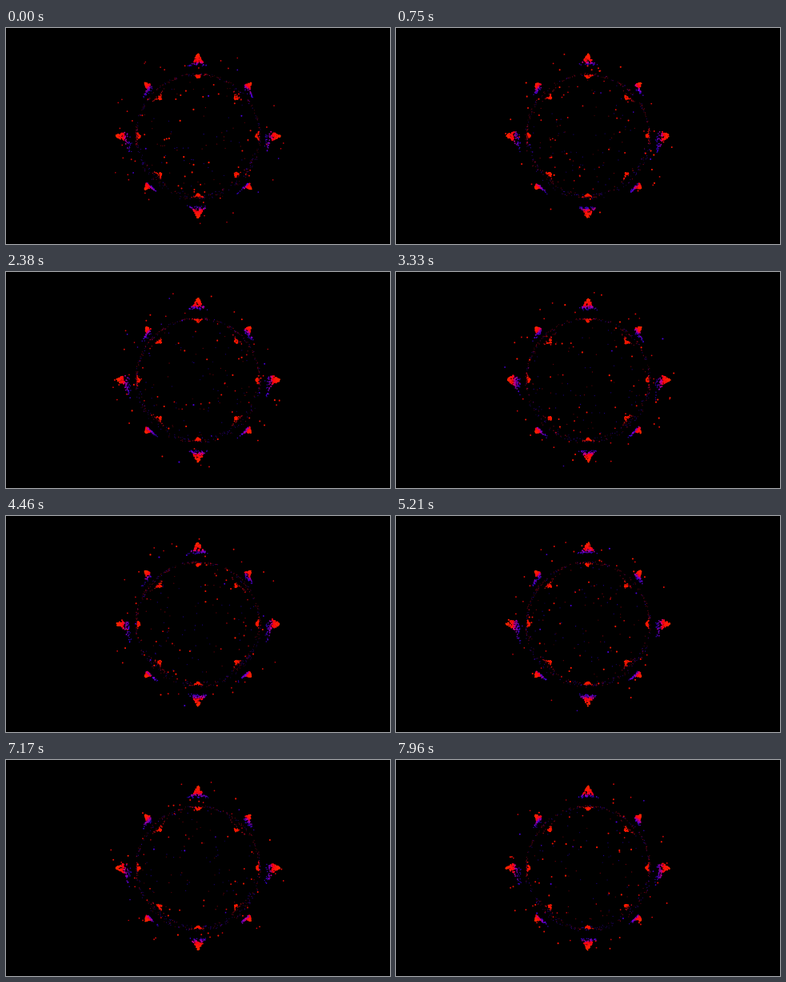
These frames come from a looping animation (480 px wide and 270 px high, 8000 ms). An HTML page with a canvas:

```html
<!DOCTYPE html>
<html lang="en">
<head>
<meta charset="utf-8">
<title>Particle ring</title>
<style>
  html, body { margin: 0; width: 100%; height: 100%; overflow: hidden; background: #000; }
  canvas { display: block; width: 480px; height: 270px; }
</style>
</head>
<body>
<canvas id="stage" width="480" height="270"></canvas>
<script>
const ctx = document.getElementById('stage').getContext('2d');
const LOOP = 8000, FPS = 24, CX = 240, CY = 135, TAU = Math.PI * 2;

function random(seed) {
  let s = Math.imul(seed + 1, 0x9E3779B1) >>> 0;
  return () => {
    s = (s + 0x6D2B79F5) >>> 0;
    let h = Math.imul(s ^ (s >>> 15), s | 1);
    h ^= h + Math.imul(h ^ (h >>> 7), h | 61);
    return ((h ^ (h >>> 14)) >>> 0) / 4294967296;
  };
}

const mix = (a, b, k) => a.map((v, i) => Math.round(v + (b[i] - v) * k));

function dot(x, y, radius, color, alpha) {
  ctx.globalAlpha = alpha;
  ctx.fillStyle = `rgb(${color})`;
  ctx.beginPath();
  ctx.arc(x, y, radius, 0, TAU);
  ctx.fill();
}

// Each slot is reborn with fresh random values when its life ends.
function particles(group, count, life, t, draw) {
  for (let i = 0; i < count; i++) {
    const id = group * 1000 + i, own = random(id);
    const p = t / (life * (0.8 + 0.4 * own())) + own();
    const birth = Math.floor(p);
    draw(p - birth, random(id + birth * 50021));
  }
}

function at(angle, r, side = 0) {
  const c = Math.cos(angle), s = Math.sin(angle);
  return [CX + c * r - s * side, CY + s * r + c * side];
}

function outerJet(group, angle, t) {
  const main = group % 2 === 0;
  const tip = main ? 102 : 93, size = main ? 14 : 8, spread = main ? 5 : 3;
  const fall = Math.cos(angle), upper = Math.sin(angle) < 0.1;
  particles(group, main ? 84 : 68, 0.9, t, (age, rnd) => {
    const late = Math.max(0, age - 0.58) / 0.42;
    const u = rnd() * 2 - 1;
    const depth = size * age ** 0.75 + (rnd() - 0.5) * 2;
    const drift = fall * 15 * late * (0.6 + 0.4 * rnd());
    const side = u * (1 + depth * 0.55 + spread * late) + drift;
    const inward = depth + Math.abs(drift) * (upper ? 0.3 : -0.15);
    const [x, y] = at(angle, tip - inward, side);
    const color = late > 0
      ? mix([215, 0, 120], [70, 0, 255], Math.min(1, late * 1.3))
      : mix([255, 40, 0], [255, 0, 25], age / 0.58);
    dot(x, y, 1.05 - 0.35 * late, color, 1 - 0.35 * late);
  });
}

function innerJet(group, angle, t) {
  const main = group % 2 === 0;
  const tip = main ? 72 : 65, size = main ? 4.5 : 6;
  particles(group, main ? 38 : 32, 0.8, t, (age, rnd) => {
    const late = Math.max(0, age - 0.6) / 0.4;
    const u = rnd() * 2 - 1;
    const side = u * (1 + 5 * age + 9 * late);
    const [x, y] = at(angle, tip + size * age + rnd(), side);
    dot(x, y, 0.9 - 0.35 * late, mix([255, 25, 0], [200, 0, 50], late), 0.95 - 0.4 * late);
  });
}

function ring(t) {
  particles(30, 300, 1.2, t, (age, rnd) => {
    const angle = rnd() * TAU + (age - 0.5) * 0.1;
    const low = Math.sin(angle) > 0.2;
    const [x, y] = at(angle, (low ? 76 : 77) + (rnd() - 0.5) * (low ? 7 : 3));
    const blue = rnd() < (low ? 0.65 : 0.35);
    dot(x, y, 0.55, blue ? [75, 0, 230] : [215, 0, 45], (0.35 + 0.5 * rnd()) * (1 - age * 0.4));
  });
}

function haze(t) {
  particles(31, 85, 1.1, t, (age, rnd) => {
    const angle = rnd() * TAU;
    const [x, y] = at(angle, 75 * Math.sqrt(rnd()) + age * 5);
    dot(x, y + 4 * age, 0.65, rnd() < 0.5 ? [50, 0, 225] : [200, 0, 20], 0.65 * (1 - age * 0.5));
  });
}

function sparks(t) {
  particles(32, 80, 1.2, t, (age, rnd) => {
    const angle = rnd() * TAU;
    const start = 106 * Math.sqrt(0.06 + 0.94 * rnd());
    const [x, y] = at(angle + (rnd() - 0.5) * age * 0.2, start + age * 8);
    const color = rnd() < 0.1 ? [75, 0, 225] : mix([255, 25, 0], [240, 0, 15], age);
    dot(x, y, 1.1 - 0.3 * age, color, 1 - 0.2 * age);
  });
}

function render(now) {
  const t = Math.floor((now % LOOP) * FPS / 1000) / FPS;
  ctx.globalAlpha = 1;
  ctx.fillStyle = '#000';
  ctx.fillRect(0, 0, 480, 270);
  ring(t);
  haze(t);
  sparks(t);
  for (let i = 0; i < 8; i++) {
    innerJet(i + 10, i * TAU / 8, t);
    outerJet(i, i * TAU / 8, t);
  }
  requestAnimationFrame(render);
}
requestAnimationFrame(render);
</script>
</body>
</html>
```
